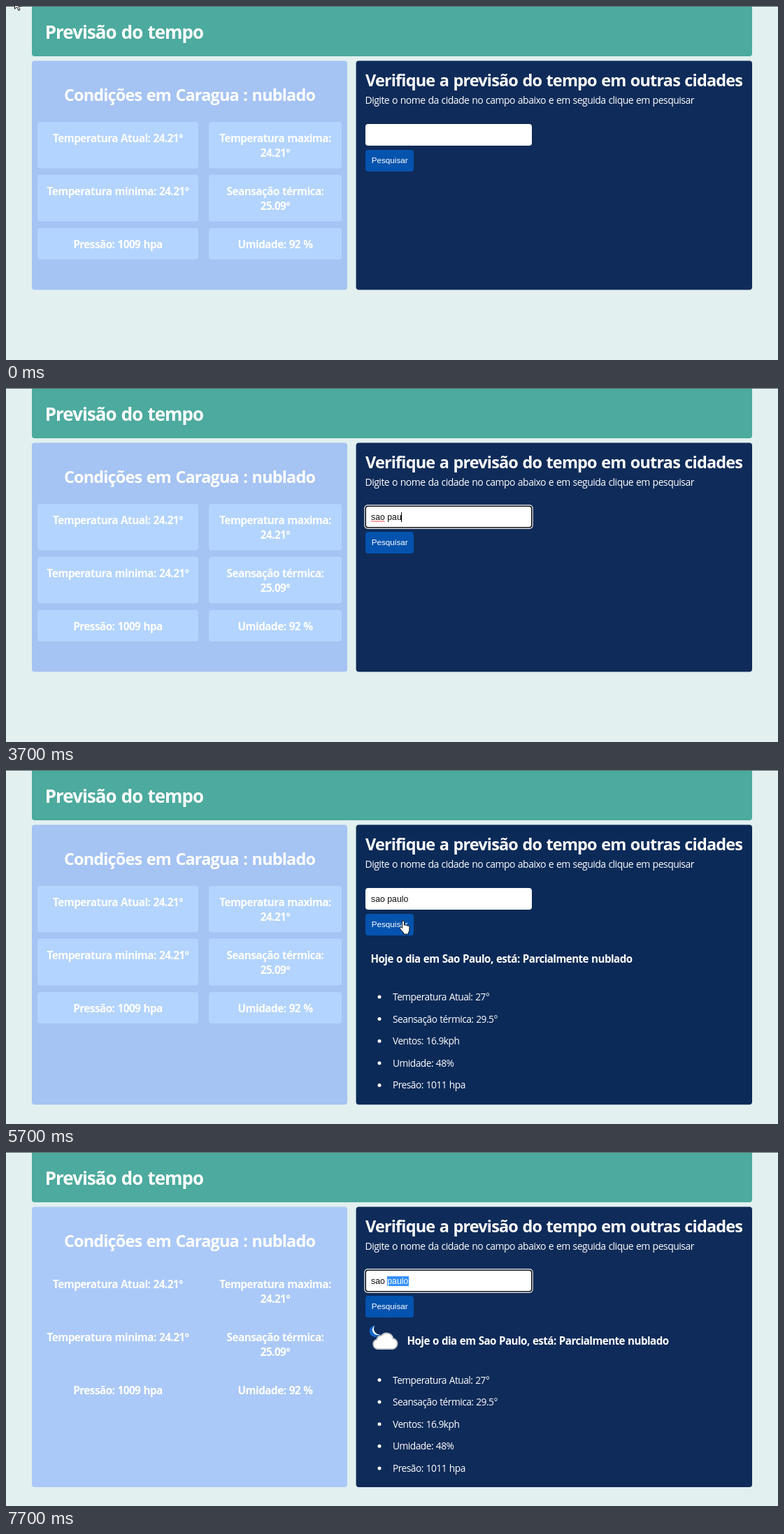
These frames come from a looping animation (1104x507 px, 8 s). An HTML page:

```html
<!DOCTYPE html>
<html lang="pt-BR">
<head>
<meta charset="utf-8">
<title>Previsão do tempo</title>
<style>
  html, body { margin: 0; width: 100%; height: 100%; overflow: hidden; background: #e2f0ef; }
  svg { display: block; }
  text { fill: #fff; font-family: "Open Sans", "Noto Sans", sans-serif; white-space: pre; }
  .bold text { font-weight: 700; letter-spacing: -.036em; word-spacing: .05em; }
  .light text { font-size: 13.75px; letter-spacing: -.037em; word-spacing: .05em; }
  .h1 { font-size: 25.9px; }
  .h2 { font-size: 23.48px; }
  .h3 { font-size: 15.3px; }
  .centered { text-anchor: middle; }
  .form text { font-family: "Liberation Sans", Arial, sans-serif; font-size: 12.3px; }
  #typed, #word { fill: #111; }
</style>
</head>
<body>
<svg width="1104" height="507" viewBox="0 0 1104 507">
  <rect width="1104" height="507" fill="#e2f0ef"/>
  <path d="M37 0H1067V68a4 4 0 0 1-4 4H41a4 4 0 0 1-4-4Z" fill="#4caa9e"/>
  <rect width="1104" height="1" fill="#5c6b6a"/>

  <rect id="left" x="37" y="78.6" width="451" rx="4"/>
  <rect id="right" x="500.6" y="78.6" width="566.4" rx="4"/>
  <g id="cards" fill="#b3d4ff"></g>

  <g class="bold">
    <text class="h1" x="55.7" y="47">Previsão do tempo</text>
    <text class="h2" x="514" y="115">Verifique a previsão do tempo em outras cidades</text>
    <g class="centered">
      <text class="h2" x="262.5" y="136">Condições em Caragua : nublado</text>
      <g id="labels"></g>
    </g>
  </g>
  <g class="light">
    <text x="513.5" y="140" style="font-size:14px">Digite o nome da cidade no campo abaixo e em seguida clique em pesquisar</text>
  </g>

  <g class="form">
    <rect x="514" y="169" width="238" height="31" rx="4" fill="#fff"/>
    <g id="ring">
      <rect x="512.3" y="167.3" width="241.4" height="34.4" rx="5" fill="#fff"/>
      <rect x="513.4" y="168.4" width="239.2" height="32.2" rx="4" fill="#101418"/>
      <rect x="515" y="170" width="236" height="29" rx="3" fill="#fff"/>
    </g>
    <rect id="selection" x="545" y="178" width="31" height="14" fill="#3390ff"/>
    <text x="522" y="189"><tspan id="typed"></tspan><tspan id="word"></tspan></text>
    <path id="squiggle" d="M522 191.5l1.5-1.5 2 2 2-2 2 2 2-2 2 2 2-2 2 2 2-2 2 2" fill="none" stroke="#e33" stroke-width="1"/>
    <rect id="caret" y="178" width="1" height="14" fill="#000"/>
    <rect x="514" y="206" width="69" height="31" rx="4" fill="#0453ae"/>
    <text x="522.7" y="225" style="font-size:11.7px">Pesquisar</text>
  </g>

  <g id="results">
    <g class="bold"><text id="today" y="276" style="font-size:15.15px">Hoje o dia em Sao Paulo, está: Parcialmente nublado</text></g>
    <g id="list" class="light"></g>
  </g>

  <g id="icon">
    <path d="M527.5 248.5A8.2 8.2 0 1 0 535 261A8 8 0 0 1 527.5 248.5Z" fill="#1268c9"/>
    <path d="M527.5 248.5A8 8 0 0 0 535 261A6.4 6.4 0 0 1 527.5 248.5Z" fill="#fff"/>
    <path d="M531 282a6.9 6.9 0 0 1-.6-13.4a6.6 6.6 0 0 1 6.6-5.5a9.3 9.3 0 0 1 16.4 4.1a7.5 7.5 0 0 1-.8 14.8Z" fill="#fff" stroke="#c9c9cc" stroke-width="2"/>
  </g>

  <path id="arrow" d="M.5 .5V14.2L3.7 11.2L5.8 16.3L8 15.4L5.9 10.4H10Z" fill="#fff" stroke="#111" stroke-width="1"/>
  <path id="hand" d="M4.2 11V1.8a1.4 1.4 0 0 1 2.8 0V7a1.4 1.4 0 0 1 2.6.4a1.4 1.4 0 0 1 2.5.6a1.3 1.3 0 0 1 2.3 1V13.5q0 2-1.4 3.7V19.5H6V17.6Q3 14.5.8 11.4Q.2 9.7 1.7 9.5Q2.8 9.6 4.2 11Z" fill="#fff" stroke="#111" stroke-width="1"/>
</svg>
<script>
const LOOP = 8000;
const ns = "http://www.w3.org/2000/svg";
const el = id => document.getElementById(id);
const set = (node, attrs) => { for (const k in attrs) node.setAttribute(k, attrs[k]); };
const show = (id, on) => { el(id).style.display = on ? "" : "none"; };

function add(parent, tag, attrs, text = "") {
  const node = document.createElementNS(ns, tag);
  set(node, attrs);
  node.textContent = text;
  el(parent).append(node);
}

const columns = [{ x: 45, width: 230 }, { x: 290, width: 190 }];
const rows = [{ y: 166, height: 66.5 }, { y: 241.5, height: 67 }, { y: 318, height: 45 }];
const conditions = [
  [["Temperatura Atual: 24.21°"], ["Temperatura maxima:", "24.21°"]],
  [["Temperatura minima: 24.21°"], ["Seansação térmica:", "25.09°"]],
  [["Pressão: 1009 hpa"], ["Umidade: 92 %"]],
];
rows.forEach((row, r) => columns.forEach((col, c) => {
  add("cards", "rect", { ...col, ...row, rx: 4 });
  conditions[r][c].forEach((line, i) => add("labels", "text",
    { class: "h3", x: col.x + col.width / 2, y: Math.round(row.y + 29) + i * 21 }, line));
}));

["Temperatura Atual: 27°", "Seansação térmica: 29.5°", "Ventos: 16.9kph", "Umidade: 48%", "Presão: 1011 hpa"]
  .forEach((line, i) => {
    const y = 330 + i * 31.6;
    add("list", "circle", { cx: 534, cy: y - 5, r: 2.5, fill: "#fff" });
    add("list", "text", { x: 553, y }, line);
  });

// [time, text, caret x]; a caret of 0 is hidden
const typing = [
  [0, "", 0], [1300, "", 522], [1900, "", 0], [2200, "s", 528], [2300, "sa", 535],
  [2600, "sao", 542], [2700, "sao ", 545], [3200, "sao ", 0], [3400, "sao pa", 558],
  [3700, "sao pau", 565], [3900, "sao paul", 567], [4100, "sao paulo", 575],
  [4600, "sao paulo", 0], [7500, "sao paulo", 560], [7700, "sao paulo", 0],
];

// [time, x, y, shape]
const pointer = [
  [0, 12, -10, "arrow"], [100, 12, -10, "arrow"], [500, 330, 110, "arrow"], [800, 560, 202, "arrow"],
  [900, 0, 0, ""], [5000, 537, 202, "hand"], [5100, 537, 202, "hand"], [5400, 562.5, 215.5, "hand"],
  [5900, 562.5, 215.5, "hand"], [6000, 640, 222, "arrow"], [6300, 866, 231, "arrow"],
  [6500, 866, 231, "arrow"], [6600, 798.5, 225.5, "arrow"], [6900, 699, 200, "arrow"], [7000, 0, 0, ""],
];

const lastIndex = (keys, t) => keys.findLastIndex(k => k[0] <= t);

function drawPointer(t) {
  const i = lastIndex(pointer, t);
  const [t0, x0, y0, shape] = pointer[i];
  const [t1, x1, y1, nextShape] = pointer[i + 1] || pointer[i];
  const p = nextShape && t1 > t0 ? (t - t0) / (t1 - t0) : 0;
  for (const id of ["arrow", "hand"]) show(id, id === shape);
  if (shape) set(el(shape), { transform: `translate(${x0 + (x1 - x0) * p} ${y0 + (y1 - y0) * p})` });
}

function draw(now) {
  const t = Math.floor(now % LOOP / 100) * 100;
  const found = t >= 5700, withIcon = t >= 5800, selected = t >= 7700;

  const height = withIcon ? 401.5 : found ? 400.6 : 327.9;
  set(el("left"), { height, fill: withIcon ? "#abc9f8" : "#a5c3f3" });
  set(el("right"), { height, fill: t >= 5200 && !withIcon ? "#0b2a58" : "#0f2b59" });
  show("cards", !withIcon);
  show("results", found);
  show("icon", withIcon);
  set(el("today"), { x: withIcon ? 573.5 : 521.5 });
  set(el("list"), { transform: `translate(0 ${withIcon ? 1.5 : 0})` });

  const [, text, caret] = typing[lastIndex(typing, t)];
  el("typed").textContent = text.slice(0, 4);
  el("word").textContent = text.slice(4);
  el("word").style.fill = selected ? "#fff" : "";
  show("selection", selected);
  show("caret", caret > 0);
  set(el("caret"), { x: caret });
  show("ring", t >= 1300 && t < 5300 || t >= 7500);
  show("squiggle", t >= 2800 && t < 5300);
  drawPointer(t);
}

const start = performance.now();
function tick() {
  draw(performance.now() - start);
  requestAnimationFrame(tick);
}
tick();
</script>
</body>
</html>
```
